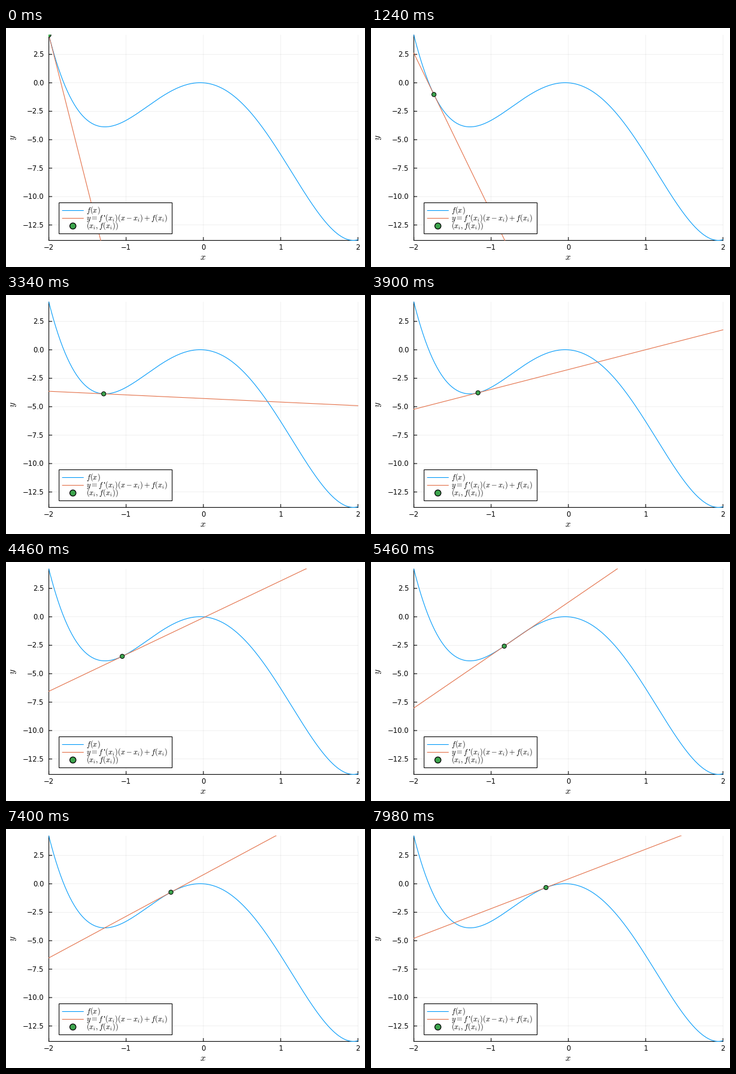
A matplotlib script that plays this animation: 600 px wide and 400 px high, repeating every 8 s.

```python
import numpy as np
import matplotlib.pyplot as plt
from matplotlib.animation import FuncAnimation
from matplotlib.patches import Circle, Rectangle

plt.rcParams["font.family"] = "DejaVu Sans"
plt.rcParams["mathtext.fontset"] = "cm"
plt.rcParams["path.snap"] = False

DPI = 100
PT = 72 / DPI  # points per pixel
LEFT, RIGHT, TOP, BOTTOM = 71.6, 588.2, 11.8, 355.5
BLUE, ORANGE, GREEN = "#009afa", "#e36f47", "#3da44d"


def f(x):
    return 1.2 * x**4 - x**3 - 6 * x**2 - 0.5 * x


def slope(x):
    return 4.8 * x**3 - 3 * x**2 - 12 * x - 0.5


xs = np.linspace(-2, 2, 401)
ys = f(xs)
y_min, y_max = ys.min(), ys.max()


def px(x):
    return LEFT + (x + 2) / 4 * (RIGHT - LEFT)


def py(y):
    return TOP + (y_max - y) / (y_max - y_min) * (BOTTOM - TOP)


fig = plt.figure(figsize=(6, 4), dpi=DPI, facecolor="white")
ax = fig.add_axes([0, 0, 1, 1])
ax.set_xlim(0, 600)
ax.set_ylim(400, 0)
ax.axis("off")


def line(x, y, color, width=1.1, **kw):
    return ax.plot(x, y, color=color, lw=width * PT, **kw)[0]


def label(x, y, text, size=8.4, **kw):
    return ax.text(x, y, text, fontsize=size, color="black", **kw)


def dot(x, y, radius, edge, **kw):
    return ax.add_patch(Circle((x, y), radius, fc=GREEN, ec="black",
                               lw=edge * PT, **kw))


# Grid, ticks and tick labels
for v in range(-2, 3):
    x = px(v)
    line([x, x], [TOP, BOTTOM], "black", 0.6, alpha=0.1, zorder=1)
    line([x, x], [BOTTOM, BOTTOM - 5], "black", zorder=2)
    label(x, 371.2, str(v).replace("-", "\u2212"), ha="center", va="baseline")
for v in np.arange(-12.5, 2.6, 2.5):
    y = py(v)
    line([LEFT, RIGHT], [y, y], "black", 0.6, alpha=0.1, zorder=1)
    line([LEFT, LEFT + 5], [y, y], "black", zorder=2)
    label(63.5, y + 4.1, f"{v:.1f}".replace("-", "\u2212"),
          ha="right", va="baseline")

# Axes
line([LEFT, LEFT], [TOP, BOTTOM], "black", zorder=2)
line([LEFT, RIGHT], [BOTTOM, BOTTOM], "black", zorder=2)
label(329.5, 388.3, "$x$", 11, ha="center", va="baseline")
label(12, 182.8, "$y$", 11, ha="center", va="center", rotation=90)

# Curve, tangent and contact point
frame = Rectangle((LEFT - 0.5, TOP - 0.5), RIGHT - LEFT + 1,
                  BOTTOM - TOP + 1, transform=ax.transData)
curve = line(px(xs), py(ys), BLUE, zorder=3)
tangent = line([], [], ORANGE, zorder=4)
point = dot(LEFT, TOP, 3.6, 1, zorder=5)
for artist in (curve, tangent, point):
    artist.set_clip_path(frame)

# Legend
ax.add_patch(Rectangle((88.7, 292.5), 189, 51.9, fc="white", ec="black",
                       lw=1.1 * PT, zorder=6))
line([94.3, 129.3], [305.5, 305.5], BLUE, zorder=7)
line([94.3, 129.3], [318.5, 318.5], ORANGE, zorder=7)
dot(111.8, 331.4, 5.1, 1.3, zorder=7)
entries = ["$f(x)$", r"$y = f\,$'$(x_i)(x - x_i) + f(x_i)$",
           "$(x_i, f(x_i))$"]
for i, text in enumerate(entries):
    label(133.8, 308.3 + 13 * i, text, 9, va="baseline", zorder=7)


def update(i):
    # Three quick steps, then a rest: seven ticks per burst
    burst, tick = divmod(i + 1, 7)
    x0 = -2 + 0.01 * (3 * burst + min(tick, 2) - 1)
    ends = np.array([-2, 2])
    tangent.set_data(px(ends), py(f(x0) + slope(x0) * (ends - x0)))
    point.center = px(x0), py(f(x0))
    return tangent, point


anim = FuncAnimation(fig, update, frames=400, interval=20, repeat=True,
                     repeat_delay=0, blit=False)
plt.show()
```
